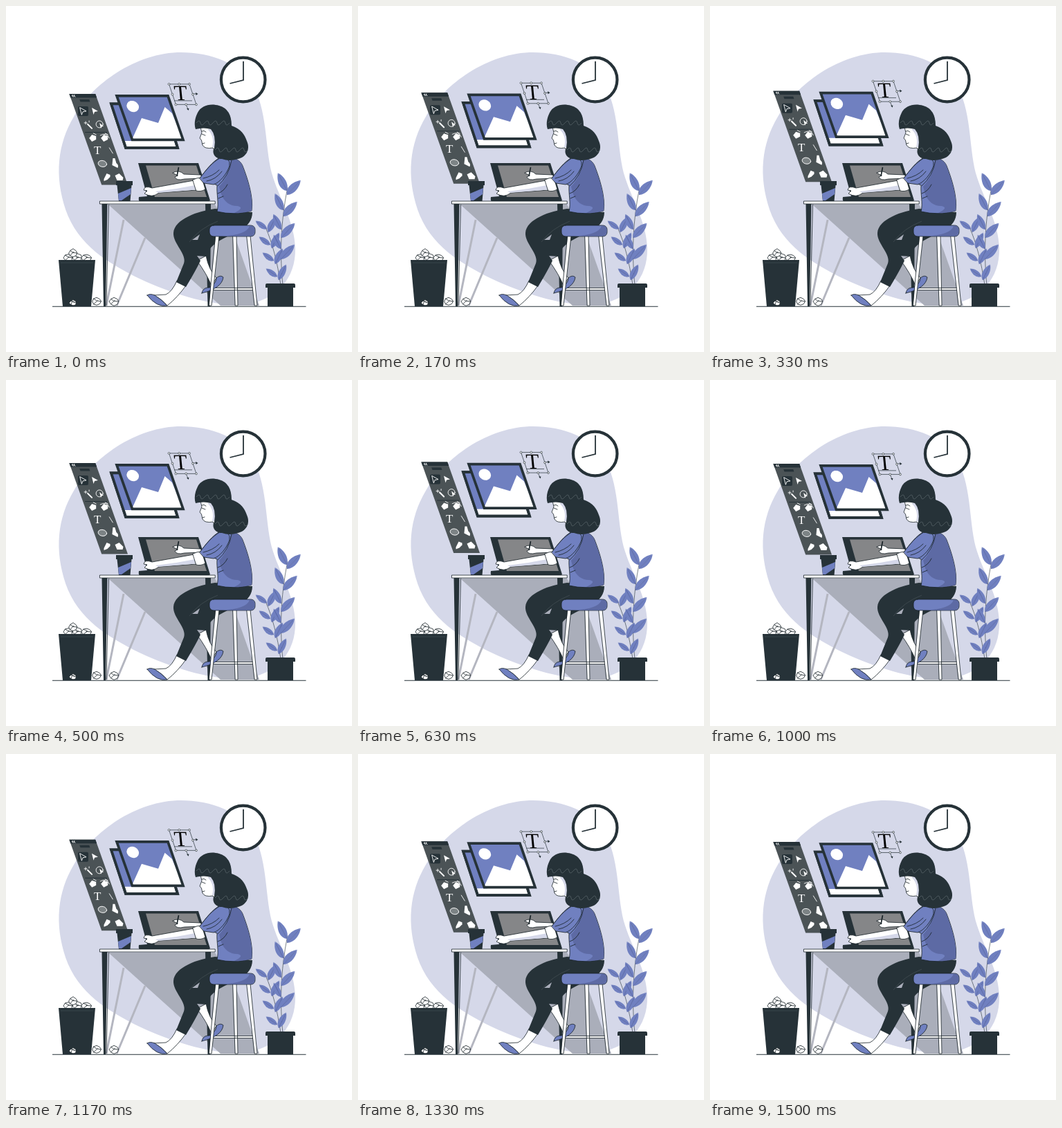
An HTML page for the animation above (1.54 s loop, 500 by 500 pixels).

```html
<!DOCTYPE html>
<html lang="en">
<head>
<meta charset="utf-8">
<title>Designer at work</title>
<style>
html, body { margin: 0; width: 100%; height: 100%; overflow: hidden; background: #fff; }
svg { display: block; width: 100%; height: 100%; }
text { font-family: "Liberation Serif", serif; text-anchor: middle; }
.dark { fill: #263238; }
.blue { fill: #7080c0; }
.shade { fill: #5d6aa4; }
.pale { fill: #d5d8e9; }
.white { fill: #fff; }
.ink { stroke: #172126; stroke-width: .8; stroke-linejoin: round; stroke-linecap: round; }
.line { fill: none; }
.frame { stroke: #263238; stroke-width: 3.7; }
.icon { fill: none; stroke: #fff; stroke-width: .9; stroke-linecap: round; stroke-linejoin: round; }
.icon .solid { fill: #fff; stroke: none; }
</style>
</head>
<body>
<svg viewBox="0 0 500 500">
  <path class="pale" d="M248 67C294 66 340 82 359 119C379 158 374 212 386 248C397 282 417 313 418 350C419 394 391 423 350 431C302 436 243 417 195 395C148 372 104 346 86 294C70 246 74 200 98 160C120 119 180 70 248 67Z"/>
  <path fill="#aaaeba" d="M148 287H302L333 340L366 433H310Z"/>
  <path class="line" stroke="#b4b6c0" stroke-width="3" d="M170 309L145 433M201 335L160 433"/>

  <!-- clock -->
  <circle class="white" cx="342.7" cy="106.5" r="31.8" stroke="#263238" stroke-width="4.2"/>
  <path class="line" stroke="#263238" stroke-width="1.8" d="M343 80V107L323.5 112"/>

  <!-- plant -->
  <g id="plant">
    <path class="line" stroke="#263238" stroke-width=".6" d="M400 403C396 365 396 315 407 262M397 403C392 370 385 342 375 320"/>
  </g>
  <path class="dark" d="M375 403Q375 401 377 401H416Q418 401 418 403V407H415V434H378V407H375Z"/>

  <!-- floating pieces -->
  <g id="float">
    <g transform="matrix(1 0 .356 1 91.4 127)">
      <path fill="#4b5356" d="M0 0H37.8V131.5H0Z"/>
      <path class="dark" d="M0 0H37.8V5.5H0ZM12 8H26V11.5H12Z"/>
      <path class="icon" d="M4.5 1.7L3 3L4.5 4.3M7 1.7L5.5 3L7 4.3"/>
      <path stroke="#263238" d="M3 55.5H35"/>
    </g>
    <rect class="dark" x="104" y="145" width="15" height="14" rx="2"/>
    <g id="tools" class="icon"></g>

    <path class="white frame" d="M152 141.5H228L248 205H173Z"/>
    <path class="blue" d="M152 141.5H170L187 195H170Z"/>
    <path class="line frame" d="M152 141.5H228L248 205H173Z"/>
    <path class="blue" d="M160 130H234L256 193.5H183Z"/>
    <ellipse class="white" cx="183.3" cy="145" rx="9.2" ry="7.8" transform="rotate(28 183 145)"/>
    <path class="white" d="M182 193L196 162L220 169L229.5 146L240 155L256 193.5Z"/>
    <path class="line frame" d="M160 130H234L256 193.5H182.5Z"/>

    <g id="box" class="line" stroke="#263238" stroke-width=".7">
      <path d="M235.5 113H265L275 142.5H245.5ZM270 127H276M260 142.5L263 149M243 137H269"/>
    </g>
    <path class="dark" d="M274 125L277.5 127L274.5 129ZM261 148H264.5L263.5 151Z"/>
    <text transform="matrix(1 0 .1 1 253.5 136.5)" font-size="31">T</text>
  </g>

  <!-- desk -->
  <path class="dark" d="M138.5 286H146.5L144 434H141ZM288 286H296L295 434H291.5Z"/>
  <path class="line ink" d="M148.5 287L145 433"/>
  <path class="dark" d="M159 253H183V259H181.5L179.5 282H163L160.5 259H159Z"/>
  <path class="blue" d="M162 271L181 263L180 272L167 281H163Z"/>
  <path class="dark" d="M191 227H278L295 281L292 283H194Q191 282 192 276L204 275Z"/>
  <path fill="#858688" d="M202 230.5H275L290 276H215Z"/>
  <rect class="white ink" x="135.8" y="282" width="166.4" height="4"/>

  <path class="white ink" d="M328 331H333L335 433H331.5ZM298 407.5H358V410.5H298Z"/>

  <!-- legs -->
  <path class="white ink" d="M276 368L289 361Q293 381 304 393L297 404Q290 387 276 368Z"/>
  <path class="blue ink" d="M283 415Q284 408 291 407Q295 408 297 404Q304 400 304 393Q310 388 314 392Q312 408 283 415Z"/>
  <path class="white ink" d="M247 397Q240 413 231 417L213 418Q226 424 233 433Q248 421 260 404Z"/>
  <path class="blue ink" d="M204 418Q208 415 215 418Q225 424 233 433Q218 436 204 418Z"/>
  <path class="dark" d="M302 293C278 296 243 308 242 328C241 343 262 359 257 372L246 399L260 406Q275 381 281 368L276 361L290 362C293 345 311 337 337 325Q356 315 356 298Z"/>
  <path fill="#aaaeba" d="M269 338L280 330L277 338Z"/>
  <path class="line" stroke="#4c575c" stroke-width=".6" d="M306 311Q280 321 265 341"/>

  <!-- stool -->
  <path class="white ink" d="M303 332H308L297 433H293.5ZM348 332H353L363 433H359.5Z"/>
  <rect class="blue ink" x="294" y="317" width="66" height="16" rx="6"/>
  <path class="shade" d="M352 317.5Q360 317 359.5 325Q359 332.5 352 332.5H312Q348 331 352 317.5Z"/>

  <!-- far hand and pen -->
  <path class="white ink" d="M241 241Q250 236 257 243L281 244L285 249L258 250Q246 253 244 247L248 245Z"/>
  <path stroke="#172126" stroke-width="1.6" d="M249.5 233L247 246"/>

  <!-- body -->
  <path class="blue ink" d="M309 219C322 217 337 219 342 231C349 249 358 276 355 296Q330 303 305 297C308 284 304 272 305 259L280 249C289 237 298 225 309 219Z"/>
  <path class="shade" d="M325 221Q340 220 343 236Q358 274 355 296Q343 300 330 299Q346 291 334 289Q318 289 311 272L308 261Q323 245 325 221Z"/>
  <path class="line ink" d="M326 223Q322 246 306 260M306 271Q315 268 320 258M307 278L314 275"/>
  <path class="white ink" d="M272 252L211 263Q200 259 199 266L204 267L200 271Q211 278 221 270L275 266Z"/>
  <path class="pale" d="M216 268Q245 265 273 259L274 265.5L220 270Z"/>
  <path class="white ink" d="M270 251Q276 248 283 248L288 265Q281 269 275 267Z"/>
  <path class="blue ink" d="M280 249C289 237 298 226 309 220Q325 218 323 231C319 243 309 255 300 258L286 256Z"/>
  <path class="line ink" d="M285 249Q299 246 308 237M290 253Q303 251 312 239"/>

  <!-- head -->
  <path class="white ink" d="M281 175L283 183L280 191L282.5 194L284 201Q287 207 299 205L307 219L315 214V177Z"/>
  <path class="pale" d="M291 178Q302 188 298 204L305 204V177Z"/>
  <path class="line ink" d="M283 185L288 187M283 181Q286 179 289 182M284 199L287 198"/>
  <path class="dark" d="M274 178C271 169 274 160 277 154C282 144 295 140 308 144Q326 149 326 173C340 178 345 186 348 195C354 208 346 219 335 221Q323 225 312 221C301 221 297 211 301 205Q304 187 296 178Q286 175 274 178Z"/>
  <path id="waves" class="line" stroke="#667176" stroke-width=".6"/>

  <!-- bin -->
  <g id="pile" class="white ink"></g>
  <path class="dark" d="M76 367H129L123 434H82Z"/>
  <path stroke="#46545b" stroke-width=".6" d="M79 371H126"/>
  <g id="litter" class="white ink"></g>
  <path stroke="#263238" stroke-width="1.1" d="M67 434.3H433.5"/>
</svg>
<script>
const byId = id => document.getElementById(id);
const add = (id, html) => byId(id).insertAdjacentHTML('beforeend', html);

let seed = 7;
const random = () => (seed = seed * 16807 % 2147483647) / 2147483647;

function leaf(x, y, angle, n) {
  const lower = `${n}0C${n * .7} ${n * .22} ${n * .25} ${n * .25} 0 0`.replace(`${n}0`, `M0 0H${n}`);
  add('plant', `<g transform="translate(${x} ${y}) rotate(${angle})">
    <path class="blue" d="M0 0C${n * .2} ${-n * .3} ${n * .65} ${-n * .26} ${n} 0Z"/>
    <path class="blue" d="${lower}"/><path stroke="#4c5996" stroke-width=".6" d="M0 0H${n * .9}"/></g>`);
}
for (let i = 0; i < 4; i++) {
  const x = 406 - 9 * Math.sin(i * .6);
  leaf(x, 267 + 28 * i, -117, 29 - 2 * i);
  leaf(x, 273 + 31 * i, -47, 29);
  leaf(377 + 5 * i, 322 + 23 * i, -145, 20);
  leaf(379 + 5 * i, 327 + 23 * i, -64, 25);
}

// Crumpled paper: a jagged outline with creases towards the middle
function paper(group, x, y, r = 7) {
  const points = Array.from({ length: 8 }, (_, i) => {
    const angle = i * Math.PI / 4, radius = r * (.78 + .3 * random());
    return [x + radius * Math.cos(angle), y + radius * .85 * Math.sin(angle)];
  });
  const creases = [0, 3, 5].map(i => `M${points[i]}L${x + random() * 4 - 2} ${y - random() * 2}`);
  add(group, `<path d="M${points.join('L')}Z${creases.join('')}"/>`);
}
for (let i = 0; i < 3; i++) paper('pile', 90 + 13 * i, 364);
paper('pile', 97, 357);
for (const x of [131, 156]) paper('litter', x, 427);
paper('litter', 97, 429, 5.5);

// Toolbar icons, two per row along the slanted panel
const cursor = 'M-4 -5L5 0L0 1L-1.5 5Z', solid = d => `<path class="solid" d="${d}"/>`;
const pen = solid('M-5 1L-1 -4L5 -2L5 3L-1 6Z') + '<path d="M1 -6L5 -4"/>';
const icons = [
  `<path d="${cursor}"/>`, solid(cursor),
  '<path stroke-width="2" d="M0 0L6 6"/><path d="M-3 -4V0M-5 -2H-1M2 -5V-3"/>',
  '<circle r="5"/>' + solid('M0 -2L6 3L3 3L2 6Z'),
  pen, pen + '<path d="M-6 -3Q4 -8 7 1"/>',
  '<text y="5" font-size="17" fill="#fff" stroke="none">T</text>', '<path d="M0 -4L5 4"/>',
  '<ellipse rx="6.3" ry="4.5" fill="#7c8385" transform="rotate(12)"/>',
  solid('M-2 -8L1 -8L3 -1Q7 2 5 6L-3 2Z'),
  solid('M-5 3L-1 -5L4 -3V0L0 4L-5 6Z'), solid('M-6 -2L0 -5L6 1L5 5H-3Z'),
];
icons.forEach((icon, i) => {
  const row = i >> 1, x = 111 + 7.1 * row + 17 * (i % 2), y = 152 + 19 * row;
  add('tools', `<g transform="translate(${x} ${y})">${icon}</g>`);
});

for (let row = 0; row < 3; row++)
  for (let col = 0; col < 3; col++)
    if (row !== 1 || col !== 1)
      add('box', `<circle fill="#fff" cx="${235.5 + 14.75 * col + 5 * row}" cy="${113 + 14.75 * row}" r="1.4"/>`);

const wave = (x, y, count) => `M${x} ${y}` + 'q5 -6 6 0t6 0'.repeat(count);
byId('waves').setAttribute('d', wave(275, 169, 4) + wave(302, 208, 4));

const PERIOD = 1540, LIFT = 8.7, LEAD = 52;
const start = performance.now();
function draw() {
  const phase = (performance.now() - start + LEAD) / PERIOD * 2 * Math.PI;
  byId('float').setAttribute('transform', `translate(0 ${-LIFT * (1 - Math.cos(phase)) / 2})`);
  requestAnimationFrame(draw);
}
draw();
</script>
</body>
</html>
```
